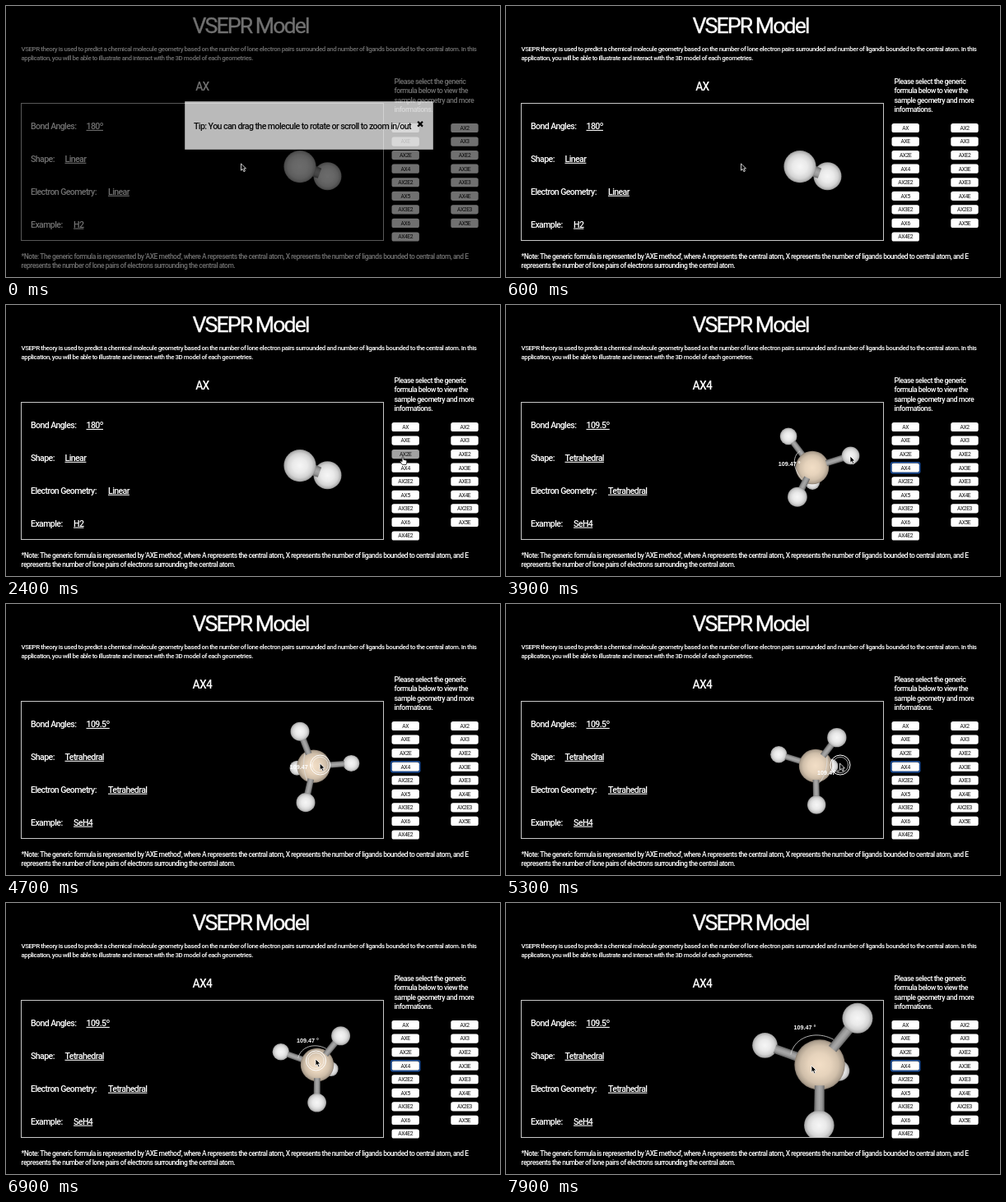
Write an HTML page with a canvas that moves like this. It is 600 px wide and 330 px high and loops after 8 s.

```html
<!DOCTYPE html>
<html lang="en">
<head>
<meta charset="utf-8">
<title>VSEPR Model</title>
<style>
html, body { margin: 0; width: 100%; height: 100%; overflow: hidden; background: #000; }
svg, canvas { position: absolute; left: 0; top: 0; width: 600px; height: 330px; }
text { font-family: Roboto, "Open Sans", sans-serif; font-weight: 500; letter-spacing: -.057em; fill: #fff; white-space: pre; }
.mid { text-anchor: middle; }
.title { font-weight: 400; letter-spacing: -.072em; stroke: #fff; stroke-width: .3; }
.value { text-decoration: underline; }
.btn text { font-size: 6.7px; font-weight: 400; fill: #111; text-anchor: middle; }
.btn rect { fill: #fff; }
.btn .ring { fill: none; stroke: #1b4f9c; stroke-width: 1.6; visibility: hidden; }
.btn.hover rect:not(.ring) { fill: #a2a2a2; }
.btn.focus .ring { visibility: visible; }
#angle { font: bold 7.2px "Liberation Sans", Arial, sans-serif; letter-spacing: 0; text-anchor: middle; }
</style>
</head>
<body>
<svg id="page" viewBox="0 0 600 330"></svg>
<canvas id="view"></canvas>
<svg viewBox="0 0 600 330">
  <text id="angle">109.47 °</text>
  <g id="tip">
    <rect width="600" height="330" fill="#000" opacity=".56"/>
    <rect x="217.5" y="116.5" width="301" height="58" fill="#fff" fill-opacity=".73" stroke="#fff" stroke-opacity=".35"/>
    <text x="228" y="149.6" font-size="10.65" style="fill:#0c0c0c">Tip: You can drag the molecule to rotate or scroll to zoom in/out</text>
    <path d="M500.2 140.8l5.8 5.8m0-5.8l-5.8 5.8" stroke="#000" stroke-width="2.2"/>
  </g>
  <g id="cursor">
    <g id="press" fill="none" stroke="#fff">
      <circle cx=".5" cy="2" r="12" stroke-width="1"/>
      <circle cx=".5" cy="2" r="9.6" stroke-width=".8" opacity=".8"/>
    </g>
    <path id="arrow" d="M0 0v8.2l1.9-1.7 1.5 3.2 1.5-.7-1.5-3.1h2.6z" fill="#000" stroke="#fff" stroke-width=".8"/>
    <path id="hand" d="M-.9.8q.9-1.4 1.8 0v3l3 .8q1.2.4.9 2l-.8 3.4h-4.6l-2.6-3.8q.2-1.4 2.3-.2z" fill="#fff" stroke="#111" stroke-width=".8"/>
  </g>
</svg>
<script>
const LOOP = 8000, STEP = 100;
const $ = id => document.getElementById(id);
const page = $('page');

function add(parent, name, attrs, content = '') {
  const el = document.createElementNS('http://www.w3.org/2000/svg', name);
  for (const k in attrs) el.setAttribute(k, attrs[k]);
  el.textContent = content;
  return parent.appendChild(el);
}
const label = (x, y, size, str, cls = '') =>
  add(page, 'text', { x, y, 'font-size': size, class: cls }, str);
const lines = (x, y, gap, size, list) =>
  list.forEach((s, i) => label(x, y + i * gap, size, s));

label(297, 32.6, 26.7, 'VSEPR Model', 'mid title');
lines(18.5, 54.9, 10.8, 7.97, [
  'VSEPR theory is used to predict a chemical molecule geometry based on the number of lone electron pairs surrounded and number of ligands bounded to the central atom. In this',
  'application, you will be able to illustrate and interact with the 3D model of each geometries.']);
lines(18.5, 307.9, 11, 8.5, [
  "*Note: The generic formula is represented by 'AXE method', where A represents the central atom, X represents the number of ligands bounded to central atom, and E",
  'represents the number of lone pairs of electrons surrounding the central atom.']);
lines(471.5, 95.3, 11.1, 8.9, [
  'Please select the generic', 'formula below to view the', 'sample geometry and more', 'informations.']);
add(page, 'rect', { x: 18.5, y: 118.5, width: 440, height: 167, fill: 'none', stroke: '#c8c8c8' });

const heading = label(238.3, 102.6, 13.8, '', 'mid');
const values = [['Bond Angles:', 97.5], ['Shape:', 71.5], ['Electron Geometry:', 124], ['Example:', 82]]
  .map(([name, x], i) => {
    const y = 149.9 + i * 39.9;
    label(30, y, 10.6, name);
    return label(x, y, 10.6, '', 'value');
  });
const facts = {
  AX: ['180º', 'Linear', 'Linear', 'H2'],
  AX4: ['109.5º', 'Tetrahedral', 'Tetrahedral', 'SeH4']
};

const buttons = {};
['AX AXE AX2E AX4 AX2E2 AX5 AX3E2 AX6 AX4E2', 'AX2 AX3 AXE2 AX3E AXE3 AX4E AX2E3 AX5E']
  .forEach((names, col) => names.split(' ').forEach((name, row) => {
    const x = 485.2 + col * 71.8, y = 148.5 + row * 16.56;
    const g = buttons[name] = add(page, 'g', { class: 'btn' });
    add(g, 'rect', { x: x - 16.7, y: y - 5.6, width: 33.4, height: 11.2, rx: 2.6 });
    add(g, 'rect', { class: 'ring', x: x - 17.5, y: y - 6.4, width: 35, height: 12.8, rx: 2 });
    add(g, 'text', { x, y: y + 2.4 }, name);
  }));

// time, x, y of the pointer tip
const pointer = [
  [0, 285.5, 192], [1500, 285.5, 192], [2300, 482, 184.5], [2400, 482, 184.5], [2600, 487, 194],
  [2700, 487, 194], [2900, 487.5, 195], [3100, 487.5, 195], [3700, 418, 184], [3900, 418, 184],
  [4200, 365, 194], [4300, 365, 194], [5300, 405.5, 194], [6000, 423.5, 165],
  [6900, 376, 190], [7200, 371, 198]];
// time, centre, then the two atoms that span the marked angle
const poses = [
  [4300, 372, 198, -28, -37, -1, -17, 30, 33],
  [5300, 376, 197, 22, -29, 28, 1, 42, 18],
  [6000, 375.5, 198, 23, -33, -27, 25, 13.5, 36],
  [6900, 378, 197, 24, -33, 25, -43, -14.5, -5],
  [7900, 381, 197, 24, -33, 25, -43, -14.5, -5]];
const zooms = [[7000, 1], [7500, 1.3], [7600, 1.3], [7900, 1.52]];

function at(table, t) {
  const n = table.findIndex(row => row[0] > t);
  if (n === 0) return table[0].slice(1);
  if (n < 0) return table[table.length - 1].slice(1);
  const a = table[n - 1], b = table[n], k = (t - a[0]) / (b[0] - a[0]);
  return a.slice(1).map((v, i) => v + (b[i + 1] - v) * k);
}

const mix = (a, p, b, q) => a.map((v, i) => v * p + b[i] * q);
const scale = (a, k) => a.map(v => v * k);
const dot = (a, b) => a[0] * b[0] + a[1] * b[1] + a[2] * b[2];
const unit = a => scale(a, 1 / Math.hypot(...a));
const cross = (a, b) => [a[1] * b[2] - a[2] * b[1], a[2] * b[0] - a[0] * b[2], a[0] * b[1] - a[1] * b[0]];

const canvas = $('view'), ctx = canvas.getContext('2d');
const ratio = Math.max(1, window.devicePixelRatio || 1);
canvas.width = 600 * ratio;
canvas.height = 330 * ratio;

const WHITE = [246, 246, 246], TAN = [242, 222, 198], FOCAL = 260, BOND = 48;
const shade = (c, k) => `rgb(${c.map(v => Math.round(v * k))})`;

function ball(x, y, r, color) {
  const g = ctx.createRadialGradient(x, y, 0, x, y, r);
  [[0, 1], [.45, .95], [.75, .86], [.93, .72], [1, .56]].forEach(([o, k]) => g.addColorStop(o, shade(color, k)));
  ctx.fillStyle = g;
  ctx.beginPath();
  ctx.arc(x, y, r, 0, 7);
  ctx.fill();
}

function rod(a, b, ra, rb) {
  const len = Math.hypot(b[0] - a[0], b[1] - a[1]) || 1;
  const nx = (a[1] - b[1]) / len, ny = (b[0] - a[0]) / len;
  const r = Math.max(ra, rb);
  const g = ctx.createLinearGradient(a[0] - nx * r, a[1] - ny * r, a[0] + nx * r, a[1] + ny * r);
  [[0, '#5c5c5c'], [.25, '#969696'], [.5, '#a8a8a8'], [.75, '#969696'], [1, '#5c5c5c']].forEach(s => g.addColorStop(...s));
  ctx.fillStyle = g;
  ctx.beginPath();
  ctx.moveTo(a[0] + nx * ra, a[1] + ny * ra);
  ctx.lineTo(b[0] + nx * rb, b[1] + ny * rb);
  ctx.lineTo(b[0] - nx * rb, b[1] - ny * rb);
  ctx.lineTo(a[0] - nx * ra, a[1] - ny * ra);
  ctx.fill();
}

function pair() {
  ball(390.5, 207.2, 17, WHITE);
  rod([368, 199], [381, 203.8], 7, 6.4);
  ball(357, 195.6, 19.6, WHITE);
}

function tetra(t) {
  const [cx, cy, ...pq] = at(poses, t), [zoom] = at(zooms, t);
  const p = pq.slice(0, 3), q = pq.slice(3);
  const u = unit(mix(p, 1, q, 1)), d = mix(p, 1, q, -1);
  const v = unit(mix(d, 1, u, -dot(d, u))), w = cross(u, v);
  const near = Math.sqrt(1 / 3), far = Math.sqrt(2 / 3);
  const project = a => {
    const s = FOCAL / (FOCAL / zoom - a[2]);
    return [cx + a[0] * s, cy + a[1] * s, s];
  };
  const atoms = [mix(u, near, v, far), mix(u, near, v, -far), mix(u, -near, w, far), mix(u, -near, w, -far)]
    .sort((a, b) => a[2] - b[2]);
  const drawBond = a => {
    const m = project(scale(a, 18)), n = project(scale(a, BOND - 9));
    rod(m, n, 3.7 * m[2], 3.7 * n[2]);
  };
  const drawAtom = a => {
    const [x, y, s] = project(scale(a, BOND));
    ball(x, y, 10.4 * s, WHITE);
  };
  const drawArc = () => {
    const half = Math.acos(near);
    ctx.beginPath();
    for (let i = -12; i <= 12; i++) {
      const k = half * i / 12;
      const [x, y] = project(mix(u, 25 * Math.cos(k), v, 25 * Math.sin(k)));
      ctx.lineTo(x, y);
    }
    ctx.strokeStyle = '#ddd';
    ctx.lineWidth = .8;
    ctx.stroke();
  };

  atoms.filter(a => a[2] < 0).forEach(a => { drawAtom(a); drawBond(a); });
  if (u[2] < 0) drawArc();
  ball(cx, cy, 20.2 * zoom, TAN);
  if (u[2] >= 0) drawArc();
  atoms.filter(a => a[2] >= 0).forEach(a => { drawBond(a); drawAtom(a); });

  const [x, y] = project(scale(u, 32));
  $('angle').setAttribute('x', x);
  $('angle').setAttribute('y', y + 2.4);
}

const show = (id, on) => { $(id).style.display = on ? '' : 'none'; };

function draw(t) {
  const name = t < 3100 ? 'AX' : 'AX4';
  heading.textContent = name;
  values.forEach((el, i) => { el.textContent = facts[name][i]; });
  buttons.AX2E.classList.toggle('hover', t >= 2300 && t < 2500);
  buttons.AX4.classList.toggle('hover', t >= 2500 && t < 3200);
  buttons.AX4.classList.toggle('focus', t >= 3100);

  ctx.setTransform(ratio, 0, 0, ratio, 0, 0);
  ctx.clearRect(0, 0, 600, 330);
  ctx.save();
  ctx.beginPath();
  ctx.rect(19, 119, 439, 166);
  ctx.clip();
  if (name === 'AX') pair(); else tetra(t);
  ctx.restore();

  show('angle', name === 'AX4');
  show('tip', t < 600);
  $('tip').setAttribute('opacity', t < 500 ? 1 : .5);

  const [x, y] = at(pointer, t), hand = t >= 2300 && t < 3200;
  $('cursor').setAttribute('transform', `translate(${x} ${y})`);
  show('hand', hand);
  show('arrow', !hand);
  show('press', t >= 4300 && t < 7000);
}

const start = performance.now();
let last = -1;
function tick() {
  const t = Math.floor((performance.now() - start) % LOOP / STEP) * STEP;
  if (t !== last) draw(last = t);
  requestAnimationFrame(tick);
}
tick();
</script>
</body>
</html>
```
